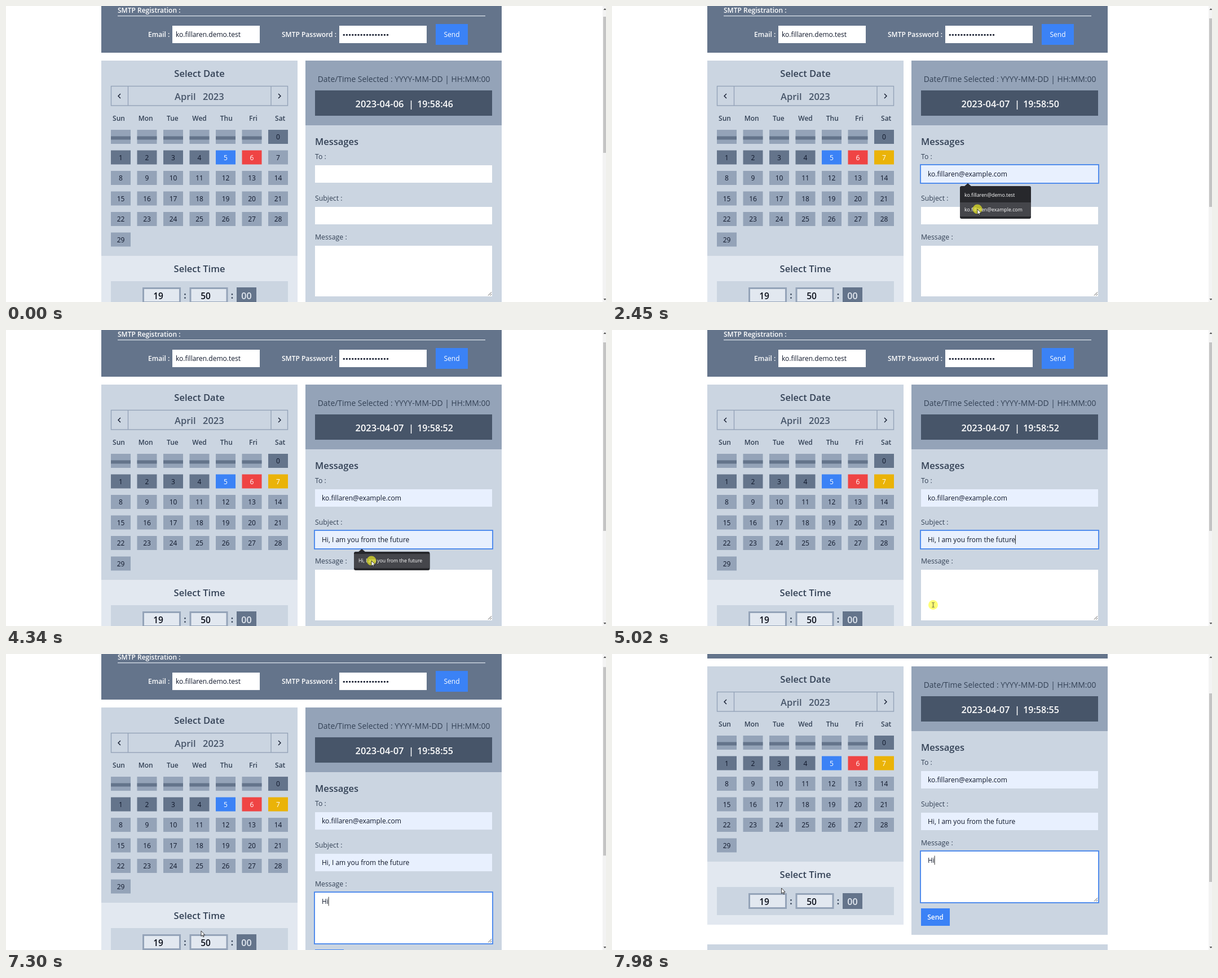
An HTML page that plays this animation: 1064x526 px, repeating every 8 s.

```html
<!DOCTYPE html>
<html lang="en">
<head>
<meta charset="utf-8">
<title>Message scheduler</title>
<style>
  html, body { margin: 0; width: 100%; height: 100%; overflow: hidden; background: #fff; }
  svg { display: block; width: 1064px; height: 526px; }
  text { font-family: "Open Sans", "Noto Sans", sans-serif; white-space: pre; }
</style>
</head>
<body>
<svg id="stage" viewBox="0 0 1064 526" xmlns="http://www.w3.org/2000/svg"></svg>
<script>
const LOOP = 8000, STEP = 68.2, BLINK = 530, PRESS = 210;
const C = {
  s200: '#e2e8f0', s300: '#cbd5e1', s400: '#94a3b8', s500: '#64748b', s600: '#475569', s700: '#334155',
  ink: '#0f172a', blue: '#3b82f6', red: '#ef4444', yellow: '#eab308', filled: '#e8f0fe', menu: '#27282c'
};
const MAIL_A = 'ko.fillaren@demo.test', MAIL_B = 'ko.fillaren@example.com';
const SUBJECT = 'Hi, I am you from the future';
const FIELDS = [
  { id: 'to', label: 'To :', y: 283, h: 31 },
  { id: 'subject', label: 'Subject :', y: 357, h: 31 },
  { id: 'body', label: 'Message :', y: 426, h: 90 }
];
const FIELD_X = 548, FIELD_W = 314;

const rect = (x, y, w, h, fill, extra = '') =>
  `<rect x="${x}" y="${y}" width="${w}" height="${h}" fill="${fill}" ${extra}/>`;
const text = (x, y, str, size = 12, { weight = 400, fill = C.ink, anchor = 'start', id = '' } = {}) =>
  `<text x="${x}" y="${y}" font-size="${size}" font-weight="${weight}" fill="${fill}" text-anchor="${anchor}"${id && ` id="${id}"`}>${str}</text>`;
const mid = (x, y, str, size, opts) => text(x, y, str, size, { anchor: 'middle', ...opts });
const line = (d, stroke, width) => `<path d="${d}" fill="none" stroke="${stroke}" stroke-width="${width}"/>`;
const title = { weight: 600, fill: C.s700 };

function registration() {
  const label = { weight: 600, fill: '#fff' };
  let dots = '';
  for (let i = 0; i < 16; i++) dots += `<circle cx="${599.3 + i * 5.15}" cy="51.3" r="1.6" fill="${C.ink}"/>`;
  return rect(169, -60, 710, 143, C.s500)
    + text(198, 12, 'SMTP Registration :', 12, label)
    + rect(198, 17, 652, 1.2, C.s200)
    + text(252, 55.3, 'Email :', 12, label) + rect(295, 35, 155, 31, '#fff')
    + text(301, 55.3, MAIL_A.replace('@', '.'))
    + text(489, 55.3, 'SMTP Password :', 12, label) + rect(591, 35, 155, 31, '#fff') + dots
    + rect(762, 32, 57, 37, C.blue) + mid(790.5, 55.3, 'Send', 12, { fill: '#fff' });
}

function calendar() {
  const month = { weight: 600, fill: C.s600 };
  let out = rect(169, 97, 348, 347, C.s300)
    + mid(343, 126, 'Select Date', 16.5, title)
    + rect(186.5, 142.5, 313, 34.5, 'none', `stroke="${C.s400}" stroke-width="1.4"`)
    + line('M216.5 142V177M470 142V177', C.s400, 1.4)
    + line('M203 156l-4 4 4 4M483 156l4 4-4 4', C.ink, 1.4)
    + text(299, 166.5, 'April', 16.5, month) + text(349, 166.5, '2023', 16.5, month);
  ['Sun', 'Mon', 'Tue', 'Wed', 'Thu', 'Fri', 'Sat'].forEach((d, i) => {
    out += mid(200 + i * 47.7, 203.5, d, 12, title);
  });
  const special = { 5: C.blue, 6: C.red };
  for (let cell = 0; cell < 36; cell++) {
    const x = 186 + (cell % 7) * 46.5, y = 220 + Math.floor(cell / 7) * 36.5, day = cell - 6;
    const fill = special[day] || (day >= 0 && day < 5 ? C.s500 : C.s400);
    out += rect(x, y, 35, 25, fill, day === 7 ? 'id="picked"' : '');
    out += day < 0 ? rect(x, y + 11.5, 35, 6, C.s500)
      : mid(x + 17.5, y + 17.2, day, 12, { fill: special[day] ? '#fff' : C.ink, id: day === 7 ? 'pickedText' : '' });
  }
  return out;
}

function timePicker() {
  const box = x => rect(x + 1.5, 501.5, 65, 25, C.s200, `stroke="${C.s400}" stroke-width="3"`);
  const num = { weight: 600, fill: '#0b0f1a' }, colon = { weight: 700, fill: C.s700 };
  return rect(169, 444, 348, 112, C.s200)
    + mid(343, 473, 'Select Time', 16.5, title)
    + rect(186, 489, 314, 50, C.s300)
    + box(242) + mid(270, 521, '19', 15.5, num) + mid(317.5, 520, ':', 15.5, colon)
    + box(325.5) + mid(354, 521, '50', 15.5, num) + mid(401, 520, ':', 15.5, colon)
    + rect(409, 500, 35, 28, C.s500) + mid(426.5, 521, '00', 16, { weight: 600, fill: C.s200 });
}

function messages() {
  const clock = { weight: 600, fill: '#fff' };
  let out = rect(531, 97, 348, 115, C.s400) + rect(531, 212, 348, 362, C.s300)
    + mid(705.5, 135, 'Date/Time Selected : YYYY-MM-DD | HH:MM:00', 13.9, { weight: 500, fill: C.s700 })
    + rect(FIELD_X, 150, FIELD_W, 45, C.s600)
    + mid(662.5, 179.5, '', 16.5, { ...clock, id: 'date' })
    + mid(718.5, 179.5, '|', 16.5, clock)
    + mid(761, 179.5, '', 16, { ...clock, id: 'clock' })
    + text(FIELD_X, 247, 'Messages', 16.5, title)
    + rect(0, 0, FIELD_W + 2, 0, 'none', 'id="focus" stroke="#4585ee" stroke-width="1.8"');
  for (const { id, label, y, h } of FIELDS) {
    out += text(FIELD_X, y - 11.5, label, 12.3, { weight: 500, fill: C.s700 })
      + rect(FIELD_X, y, FIELD_W, h, '#fff', `id="${id}Box"`)
      + text(560, y + 20, '', 12, { id });
  }
  return out + line('M855 514.5l6-6M858.5 514.5l2.5-2.5', '#555', 1)
    + rect(FIELD_X, 527, 51, 31, C.blue) + mid(573.5, 547, 'Send', 12, { weight: 600, fill: '#fff' })
    + rect(0, 0, 1, 16, '#333', 'id="caret"');
}

function menu(id, y, width, items) {
  let out = `<g id="${id}"><path d="M624 ${y + 1}l7-6 7 6z" fill="${C.menu}"/>`
    + rect(617, y, width, 8 + items.length * 25, C.menu, 'rx="3"');
  items.forEach((item, i) => {
    out += rect(617, y + 4 + i * 25, width, 25, '#45464b', `id="${id}${i}"`)
      + text(625, y + 19.3 + i * 25.2, item, 8.75, { fill: '#fff' });
  });
  return out + '</g>';
}

document.getElementById('stage').innerHTML = rect(0, 0, 1064, 526, '#fff')
  + '<g id="page">' + registration() + calendar() + timePicker() + messages()
  + rect(169, 591, 710, 100, C.s300) + '</g>'
  + menu('toMenu', 320, 126, [MAIL_A, MAIL_B]) + menu('subjectMenu', 394, 134.5, [SUBJECT])
  + rect(1058, 0, 6, 526, '#f3f3f3') + rect(1059, 0, 5, 0, '#c4c4c4', 'id="thumb"')
  + '<path d="M1059.5 7l2.5-3 2.5 3zM1059.5 520l2.5 3 2.5-3z" fill="#505050"/>'
  + `<circle id="halo" r="8.5" fill="#ffff20" opacity=".62"/>
  <g id="cursor" stroke-linejoin="round">
    <path id="arrow" d="M0 0v9.6l2.2-2 1.5 3.2 1.4-.6-1.4-3.1h3z" fill="#fff" stroke="#111" stroke-width=".8"/>
    <path id="beam" d="M-2.2-4h1.6l.6.6.6-.6h1.6M0-3.4v7M-2.2 4.2h1.6l.6-.6.6.6h1.6" fill="none" stroke="#333" stroke-width=".8"/>
    <path id="hand" d="M-1.2 0q1.2-1.4 2.4 0v4.6l4.6 1q1.4.4 1.2 2l-.6 3.6-1.2 2.8h-5.4l-4.2-5.2q.6-1.6 2-.8l1.2 1.2z" fill="#fff" stroke="#111" stroke-width=".8"/>
  </g>`;

const el = {};
document.querySelectorAll('[id]').forEach(n => { el[n.id] = n; });
const set = (id, attrs) => { for (const k in attrs) el[id].setAttribute(k, attrs[k]); };
const show = (id, on) => set(id, { visibility: on ? 'visible' : 'hidden' });
const within = (v, a, b) => v >= a && v < b;
const ease = u => { u = Math.min(1, Math.max(0, u)); return u * u * (3 - 2 * u); };

// When each action takes effect
const T = {
  appear: 70, pick: 200, toFocus: 1290, toChoose: 2660, subjectFocus: 3200,
  subjectChoose: 4540, bodyFocus: 5080, typeH: 5620, typeI: 5830, scroll: 7272
};
const CARET_RESETS = [T.toFocus, T.toChoose, T.subjectFocus, T.subjectChoose, T.bodyFocus, T.typeH, T.typeI];
const PRESSES = [T.pick, T.toFocus, T.toChoose - PRESS, T.subjectFocus, T.subjectChoose - PRESS, T.bodyFocus - 60];

const HOME = { x: 485.5, y: 273.5 };
const move = (start, duration, x, y) => ({ start, duration, x, y });
const MOVES = [
  move(610, 400, 651.5, 309),
  move(1700, 740, 648, 361),
  move(2600, 400, 628, 375),
  move(3670, 670, 648, 410),
  move(4480, 270, 569.5, 488.5),
  move(6170, 260, 432, 484),
  move(6570, 280, 330, 509),
  move(6850, 190, 346, 492),
  move(7720, 250, 300.5, 416)
];

function cursorAt(t) {
  let { x, y } = HOME;
  for (const m of MOVES) {
    const e = ease((t - m.start) / m.duration);
    x += (m.x - x) * e;
    y += (m.y - y) * e;
  }
  return [x, y];
}

function render(t) {
  const stepped = Math.floor((t + 30) / STEP) * STEP;
  const scroll = 75 * ease((stepped - T.scroll) / 265);
  const [x, y] = cursorAt(stepped);
  set('page', { transform: `translate(0 ${-scroll})` });
  const early = t < 740;
  set('thumb', { y: early ? 19 : 22 + scroll * 0.64, height: early ? 242 : 335 });

  const picked = t >= T.pick;
  set('picked', { fill: picked ? C.yellow : C.s400 });
  set('pickedText', { fill: picked ? '#fff' : C.ink });
  el.date.textContent = picked ? '2023-04-07' : '2023-04-06';
  el.clock.textContent = '19:58:' + (t < T.appear ? 46 : 48 + Math.floor((t - 270) / 1003));

  const toOpen = within(t, T.toFocus, T.toChoose), subjectOpen = within(t, T.subjectFocus, T.subjectChoose);
  const overA = toOpen && within(y, 324, 349), overB = toOpen && y >= 349;
  const overSubject = subjectOpen && y >= 398;
  const onMenu = overA || overB || overSubject;
  show('toMenu', toOpen);
  show('subjectMenu', subjectOpen);
  set('toMenu0', { opacity: +overA });
  set('toMenu1', { opacity: +overB });
  set('subjectMenu0', { opacity: +overSubject });

  el.to.textContent = overA ? MAIL_A : overB || t >= T.toChoose ? MAIL_B : '';
  el.subject.textContent = overSubject || t >= T.subjectChoose ? SUBJECT : '';
  el.body.textContent = 'Hi'.slice(0, (t >= T.typeH) + (t >= T.typeI));
  for (const id of ['to', 'subject']) set(id + 'Box', { fill: el[id].textContent ? C.filled : '#fff' });

  const focused = FIELDS[[T.toFocus, T.subjectFocus, T.bodyFocus].filter(time => t >= time).length - 1];
  const lastReset = CARET_RESETS.filter(time => t >= time).pop();
  show('focus', focused);
  show('caret', focused && !onMenu && (t - lastReset) % (2 * BLINK) < BLINK);
  if (focused) {
    const { id, y: top, h } = focused;
    set('focus', { x: FIELD_X - 1, y: top - 1, height: h + 2 });
    const end = el[id].textContent ? el[id].getComputedTextLength() : 0;
    set('caret', { x: 559.7 + end, y: top + 7.5 });
  }

  const onField = !onMenu && within(x, FIELD_X, FIELD_X + FIELD_W)
    && FIELDS.some(f => within(y + scroll, f.y, f.y + f.h));
  const onDay = within(x, 465, 500) && within(y + scroll, 256, 281);
  show('cursor', t >= T.appear);
  set('cursor', { transform: `translate(${x} ${y})` });
  set('arrow', { opacity: +!(onField || onDay) });
  set('beam', { opacity: +onField });
  set('hand', { opacity: +onDay });
  set('halo', { cx: x, cy: y });
  show('halo', PRESSES.some(time => within(t, time, time + PRESS)));
}

const start = performance.now();
function tick() {
  render((performance.now() - start) % LOOP);
  requestAnimationFrame(tick);
}
tick();
</script>
</body>
</html>
```
